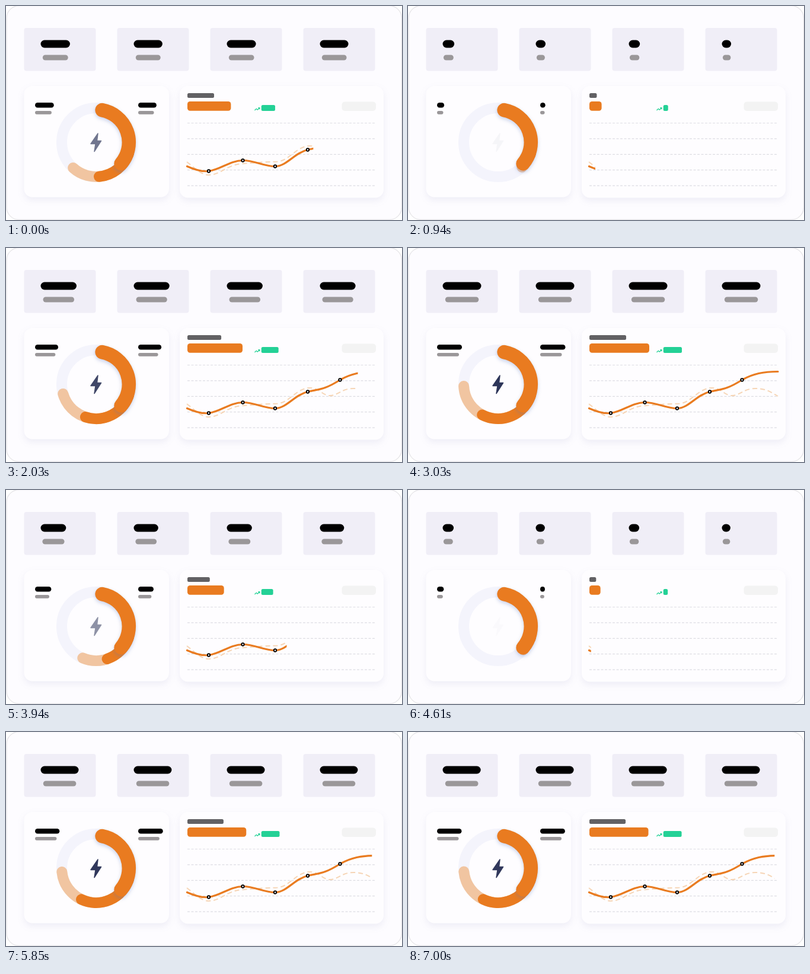
Write an HTML page that moves like this. It is 668 px wide and 361 px high and loops after 7030 ms.

```html
<!DOCTYPE html>
<html lang="en">
<head>
<meta charset="utf-8">
<title>Dashboard</title>
<style>
  html, body { margin: 0; width: 100%; height: 100%; overflow: hidden; background: #fff; }
  svg { display: block; width: 668px; height: 361px; }
  .panel { fill: #fefdff; filter: drop-shadow(0 5px 6px rgba(90, 90, 150, .09)); }
  .arc { fill: none; stroke-linecap: round; }
  .lift { filter: drop-shadow(0 3px 3px rgba(90, 120, 190, .32)); }
</style>
</head>
<body>
<svg id="stage" viewBox="0 0 668 361">
  <defs>
    <clipPath id="reveal"><rect id="window" x="300" y="190" width="0" height="120"/></clipPath>
  </defs>
  <rect x="1" y="-.5" width="666.5" height="361" rx="21" fill="#fdfcff" stroke="#e6e5e8" stroke-width="1.3"/>
  <g id="cards" fill="#f0eef7"></g>
  <rect class="panel" x="30.5" y="135" width="244.5" height="187.5" rx="14"/>
  <rect class="panel" x="293" y="135" width="344" height="188.5" rx="14"/>

  <circle cx="152" cy="230" r="58" fill="none" stroke="#f4f4fc" stroke-width="18"/>
  <path id="pale" class="arc" stroke="#f1c5a1" stroke-width="18"/>
  <path id="mid" class="arc" stroke="#e97b20" stroke-width="18"/>
  <path id="main" class="arc lift" stroke="#e97b20" stroke-width="23.5"/>
  <path id="bolt" d="M155 215L143 232.5H151L149 245.5L160.500 227.500H153.500Z"
        fill="#2d3559" stroke="#2d3559" stroke-width="1.5" stroke-linejoin="round"/>

  <rect x="566.5" y="161.500" width="57.5" height="15.500" rx="5" fill="#f3f3f3"/>
  <path d="M419.500 176L422.300 173.300L424.300 175.200L427.500 172M425.300 171.700H427.800V174.200"
        fill="none" stroke="#24d196" stroke-width="1.3"/>
  <g id="grid" stroke="#dddde3" stroke-width="1.2" stroke-dasharray="4 2.500"></g>
  <g clip-path="url(#reveal)">
    <path d="M305 263C315 270 328 285 342 285C362 285 372 268 398 266C425 264 440 263 458 262.500C478 261 490 236 513 236C528 236 534 249 546 249C560 249 566 237 586 237C604 237 612 243 624 250"
          fill="none" stroke="#f6d5b6" stroke-width="2" stroke-dasharray="8 5"/>
    <path d="M305.500 270.500C318 276 330 280 342 278.500C362 276 378 260.500 399.500 260.500C420 260.500 436 271 454 270.500C474 270 486 248 509 242.500C527 238 536 240 563.500 222.500C582 212 600 208.500 624 208.500"
          fill="none" stroke="#e97b20" stroke-width="3.2" stroke-linecap="round"/>
    <g id="dots" fill="#fff" stroke="#000" stroke-width="1.9"></g>
  </g>
  <g id="bars"></g>
</svg>
<script>
const LOOP = 7030, RAMP = 1370;
// Each ramp: start time, value it moves to.
const RAMPS = [[-705, 0], [740, 1], [3070, 0], [4497, 1], [6860, 0]];

const $ = id => document.getElementById(id);
const set = (el, attrs) => {
  for (const k in attrs) el.setAttribute(k, attrs[k]);
  return el;
};
const add = (parent, tag, attrs) =>
  parent.appendChild(set(document.createElementNS('http://www.w3.org/2000/svg', tag), attrs));

const bars = [];
function bar(x, y, h, min, max, fill, rx = h / 2, drift = 0) {
  bars.push({ x, min, max, drift, el: add($('bars'), 'rect', { y, height: h, rx, fill }) });
}

[[18, 15.5], [14.8, 12.5], [17, 15], [13.8, 12]].forEach(([dark, grey], i) => {
  const x = 30.5 + 157 * i;
  add($('cards'), 'rect', { x, y: 37, width: 121, height: 72.5, rx: 4 });
  bar(x + 28, 57.5, 13, dark, 65, '#000');
  bar(x + 29.3, 82.5, 9, grey, 56.5, '#9a9799', 4.5, 3);
});
bar(49, 163, 8.5, 11, 42, '#000');
bar(49, 177, 5.7, 9.5, 37, '#9a9799');
bar(223, 163, 8.5, 7.5, 42.5, '#000');
bar(223, 177, 5.7, 6.5, 36.5, '#9a9799');
bar(306, 147, 8, 10.7, 62, '#626164', 2.5);
bar(306, 161, 15.7, 17.7, 101, '#e97b20', 4.5);
bar(430.7, 167, 10, 7.2, 31.3, '#24d196', 2.5);

for (let i = 0; i < 5; i++) {
  const y = 197.5 + 26.4 * i;
  add($('grid'), 'line', { x1: 306, x2: 624, y1: y, y2: y });
}
for (const [cx, cy] of [[342, 278.5], [399.5, 260.5], [454, 270.5], [509, 242.5], [563.5, 222.5]])
  add($('dots'), 'circle', { cx, cy, r: 2.2 });

// Clockwise arc around the ring centre, degrees from the top.
function arc(r, from, to) {
  const at = deg => {
    const a = deg * Math.PI / 180;
    return `${152 + r * Math.sin(a)} ${230 - r * Math.cos(a)}`;
  };
  return `M${at(from)}A${r} ${r} 0 ${to - from > 180 ? 1 : 0} 1 ${at(to)}`;
}
set($('main'), { d: arc(55.3, 10.5, 130.5) });

// cubic-bezier(.42, 0, 1, 1)
function easeIn(x) {
  if (x <= 0) return 0;
  if (x >= 1) return 1;
  let lo = 0, hi = 1;
  for (let i = 0; i < 24; i++) {
    const u = (lo + hi) / 2, v = 1 - u;
    if (1.26 * u * v * v + 3 * u * u * v + u * u * u < x) lo = u; else hi = u;
  }
  return lo * lo * (3 - 2 * lo);
}

function level(t) {
  const [start, goal] = RAMPS.filter(r => r[0] <= t).pop();
  const e = easeIn((t - start) / RAMP);
  return goal ? e : 1 - e;
}

function draw(now) {
  const p = level(now % LOOP);
  for (const b of bars)
    set(b.el, { x: b.x + b.drift * p, width: b.min + (b.max - b.min) * p });
  set($('window'), { width: p > 0 ? 5 + 319 * p + (p === 1 ? 3 : 0) : 0 });
  set($('mid'), { d: arc(58, 108, 109.5 + 98 * p) });
  set($('pale'), { d: arc(58, 108, 131.4 + 135.6 * p) });
  set($('bolt'), { opacity: p });
}

let origin;
function tick(now) {
  origin ??= now;
  draw(now - origin);
  requestAnimationFrame(tick);
}
draw(0);
requestAnimationFrame(tick);
</script>
</body>
</html>
```
